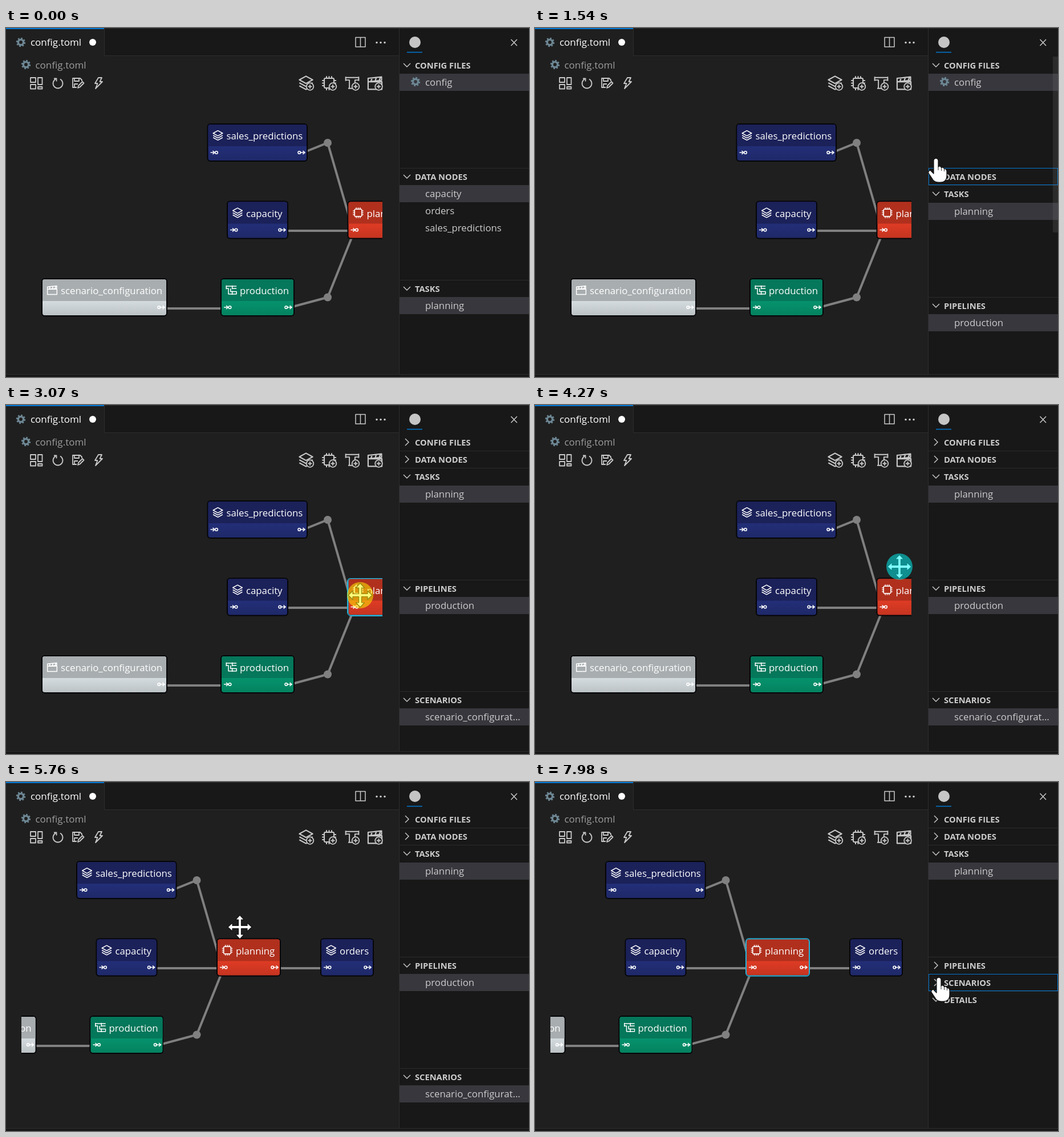
An HTML page for the animation above (8 s loop, 917 by 611 pixels).

```html
<!DOCTYPE html>
<html lang="en">
<head>
<meta charset="utf-8">
<title>Config editor</title>
<style>
html, body { margin: 0; width: 100%; height: 100%; overflow: hidden; background: #1f1f1f; }
body { position: relative; font: 16.8px "Open Sans", "Noto Sans", sans-serif; }
svg { display: block; overflow: visible; }
.layer { position: absolute; left: 0; top: 0; width: 917px; height: 611px; }
.icon, symbol { fill: none; stroke-linejoin: round; }
.icon { stroke: #c8c8c8; stroke-width: 1.8; }
.gear { fill: none; stroke: #6d8794; }

/* graph */
#graph { animation: pan 8s step-end infinite; }
.wire { fill: none; stroke: #808080; stroke-width: 4; }
.joint { fill: #808080; }
.node text { fill: #fff; }
.node .icon { stroke: #fff; }
.port { fill: none; stroke: #fff; stroke-width: 1.6; }
.port circle { fill: #fff; stroke: none; }
.ring { fill: none; stroke: #27b5dc; stroke-width: 2; animation: pick 8s step-end infinite; }

/* side bar */
#side { position: absolute; left: 690px; top: 50px; width: 227px; height: 555px; overflow: hidden; color: #ccc; }
.pane { height: 195.3px; overflow: hidden; white-space: nowrap; animation: var(--shut, none) 8s steps(2) infinite; }
.head { position: relative; box-sizing: border-box; height: 30.2px; padding-left: 27px;
  border-top: 1px solid #2b2b2b; font-size: 14.7px; font-weight: 700; line-height: 29px; }
.pane:first-child .head { border-color: transparent; }
.head::after { content: ""; position: absolute; inset: -1px 0 0; border: 1px solid #0078d4; opacity: 0;
  animation: var(--focus, none) 8s step-end infinite; }
.chev, .plus { position: absolute; fill: none; stroke: #ccc; stroke-width: 1.4; }
.chev { left: 6px; top: 7px; animation: var(--turn, none) 8s step-end infinite; }
.plus { right: 6px; top: 5px; opacity: 0; animation: var(--add, none) 8s step-end infinite; }
.row { position: relative; height: 30px; padding-left: 45px; line-height: 30px; }
.on { background: #37373d; }
.row svg { position: absolute; left: 28px; top: 14px; }
#bar { position: absolute; right: 0; top: 0; width: 9px; background: #79797933; opacity: 0;
  animation: grow 8s steps(2) infinite, show 8s step-end infinite; }

/* pointer */
#pointer { animation: travel 8s step-end infinite; }
#hand { animation: hand 8s step-end infinite; }
#move { animation: move 8s step-end infinite; }
#press { fill: none; animation: press 8s step-end infinite; }
.shape { fill: #fff; stroke: #111; stroke-width: 1.2; stroke-linejoin: round; }

@keyframes pan {
  0%, 53.375% { transform: translate(0, 0); animation-timing-function: steps(3); }
  57.25% { transform: translate(-103px, -23px); animation-timing-function: steps(4); }
  62%, 100% { transform: translate(-229.5px, -29px); }
}
@keyframes pick {
  0% { opacity: 0; } 37.125% { opacity: 1; } 44.625% { opacity: 0; } 73.5%, 100% { opacity: 1; }
}
@keyframes travel {
  0% { transform: translate(800px, 700px); }
  1.25% { transform: translate(790px, 600px); animation-timing-function: steps(8); }
  11.25% { transform: translate(719px, 264px); }
  12.5% { transform: translate(714px, 263px); }
  13.75%, 18% { transform: translate(711px, 262px); }
  19.25% { transform: translate(702px, 228px); animation-timing-function: steps(5); }
  25.5%, 28.75% { transform: translate(709px, 67px); animation-timing-function: steps(6); }
  35.875% { transform: translate(603px, 340px); }
  37.125% { transform: translate(612px, 335px); }
  38.375%, 44.625% { transform: translate(621px, 333px); animation-timing-function: steps(2); }
  47.125%, 53.375% { transform: translate(639px, 283px); animation-timing-function: steps(3); }
  57.25% { transform: translate(484.5px, 255px); animation-timing-function: steps(4); }
  62%, 72.25% { transform: translate(410px, 254px); animation-timing-function: steps(4); }
  77.25% { transform: translate(692px, 321px); animation-timing-function: steps(3); }
  81%, 87.25% { transform: translate(709px, 326px); animation-timing-function: steps(2); }
  89.75%, 100% { transform: translate(707px, 342px); }
}
@keyframes hand { 0% { opacity: 1; } 31.1% { opacity: 0; } 77.25%, 100% { opacity: 1; } }
@keyframes move { 0% { opacity: 0; } 31.1% { opacity: 1; } 77.25%, 100% { opacity: 0; } }
@keyframes press {
  0%, 16.75%, 28.125%, 44.625%, 72%, 87.25%, 97.25%, 100% { fill: #ff00; }
  15.5%, 26.875%, 37.125%, 81%, 91% { fill: #fff00088; }
  53.375% { fill: #00ffff80; }
}
@keyframes shut-data { 0%, 16.75% { height: 195.3px; } 19.25%, 100% { height: 30.2px; } }
@keyframes shut-config { 0%, 28.125% { height: 195.3px; } 30.625%, 100% { height: 30.2px; } }
@keyframes shut-pipes { 0%, 87.25% { height: 195.3px; } 89.75%, 100% { height: 30.2px; } }
@keyframes shut-scenes { 0%, 97.25% { height: 195.3px; } 99.75%, 100% { height: 30.2px; } }
@keyframes turn-data { 0% { transform: none; } 16.75%, 100% { transform: rotate(-90deg); } }
@keyframes turn-config { 0% { transform: none; } 28.125%, 100% { transform: rotate(-90deg); } }
@keyframes turn-pipes { 0% { transform: none; } 87.25%, 100% { transform: rotate(-90deg); } }
@keyframes turn-scenes { 0% { transform: none; } 97.25%, 100% { transform: rotate(-90deg); } }
@keyframes focus-data { 0%, 28.125%, 100% { opacity: 0; } 16.75% { opacity: 1; } }
@keyframes focus-config { 0%, 37.125%, 100% { opacity: 0; } 28.125% { opacity: 1; } }
@keyframes focus-pipes { 0%, 97.25%, 100% { opacity: 0; } 87.25% { opacity: 1; } }
@keyframes focus-scenes { 0% { opacity: 0; } 97.25%, 100% { opacity: 1; } }
@keyframes add-data { 0%, 16.75%, 100% { opacity: 0; } 10% { opacity: 1; } }
@keyframes add-pipes { 0%, 87.25%, 100% { opacity: 0; } 77.25% { opacity: 1; } }
@keyframes add-scenes { 0%, 97.25%, 100% { opacity: 0; } 89.75% { opacity: 1; } }
@keyframes grow {
  0%, 16.75% { height: 263px; } 19.25%, 28.125% { height: 308px; }
  30.625%, 87.25% { height: 367px; } 89.75%, 100% { height: 456px; }
}
@keyframes show {
  0%, 37.125%, 97.25%, 100% { opacity: 0; } 2.5%, 77.25% { opacity: 1; }
}
</style>
</head>
<body>
<svg class="layer" viewBox="0 0 917 611">
  <defs>
    <symbol id="layers" viewBox="0 0 24 24"><path d="M12 2 22 7.5 12 13 2 7.5zM2 12l10 5.5L22 12M2 16.5 12 22l10-5.5"/></symbol>
    <symbol id="chip" viewBox="0 0 24 24"><path d="M6 4.500h12q1.500 0 1.500 1.500v12q0 1.500-1.500 1.500H6q-1.500 0-1.500-1.500V6q0-1.500 1.500-1.500zM8 1v3.500M12 1v3.500M16 1v3.500M8 19.500V23M12 19.500V23M16 19.500V23M1 8h3.500M1 12h3.500M1 16h3.500M19.500 8H23M19.500 12H23M19.500 16H23"/></symbol>
    <symbol id="tee" viewBox="0 0 24 24"><path d="M1.500 2v7M22.500 2v7M1.500 3.500h21M1.500 7.500h6V21h9V7.500h6M5.500 21h13"/></symbol>
    <symbol id="pipe" viewBox="0 0 24 24"><path d="M1.500 2v8M1.500 3.500H14M1.500 8.500H6V20h8M10.500 8.500V15H14M14 2v8M14 3.500h9M14 8.500h9M14 13.500v8M14 15h9v5h-9"/></symbol>
    <symbol id="clap" viewBox="0 0 24 24"><path d="M2 10h20v11H2zM2 10V5l19.500-2v5L2 10M8 4.500 6 9.500M14 4l-2 5M20 3.300 18 8.400"/></symbol>
    <g id="gear"><circle r="4.600" stroke-width="3.400"/><circle r="6.800" stroke-width="2.800" stroke-dasharray="2.670"/></g>
    <g id="in"><path d="M0 0h8M4-3l3.500 3L4 3"/><circle cx="10.500" r="2.300"/></g>
    <g id="out"><circle cx="2.300" r="2.300"/><path d="M3 0h9M8.500-3 12 0 8.500 3"/></g>
    <g id="badge"><circle r="6.300" fill="#1f1f1f"/><path d="M-3.500 0h7M0-3.500v7"/></g>
    <linearGradient id="sheen" x2="0" y2="1"><stop offset=".55" stop-opacity="0"/><stop offset="1" stop-opacity=".13"/></linearGradient>
    <clipPath id="view"><path d="M27 115h633v490H27z"/></clipPath>
  </defs>

  <!-- window frame -->
  <path d="M172 0h745v48H172zM690 0h227v611H690zM0 607h917v4H0z" fill="#181818"/>
  <path d="M172 .5h745M172.500 0v48.500H689M689.500 0v606M0 606.500h917" fill="none" stroke="#2d2d2d"/>
  <path d="M0 1h172" stroke="#0078d4" stroke-width="2"/>
  <path d="M703 42.500h27" stroke="#0078d4" stroke-width="1.500"/>
  <use href="#gear" class="gear" x="26" y="25"/>
  <text x="43" y="31" font-size="17" fill="#fff">config.toml</text>
  <circle cx="152" cy="25" r="6" fill="#fff"/>
  <use href="#gear" class="gear" x="35" y="64"/>
  <text x="51.500" y="71" font-size="17" fill="#9d9d9d">config.toml</text>
  <circle cx="717" cy="25" r="10" fill="#c5c5c5"/>
  <path d="M613 16.500h17v16.500h-17zM621.500 16.500V33M885.500 20l10.500 11M896 20l-10.500 11" class="icon" style="stroke-width:1.500"/>
  <g fill="#ccc"><circle cx="650" cy="25.500" r="1.700"/><circle cx="657" cy="25.500" r="1.700"/><circle cx="664" cy="25.500" r="1.700"/></g>

  <!-- toolbar -->
  <g class="icon">
    <path d="M43 87h9v8h-9zM43 99h9v7.500h-9zM56 87h7.500v12H56zM56 103h7.500v3.500H56z"/>
    <path d="M87 89.500a8.500 8.500 0 1 0 8 0M84 88.500h4.500v5"/>
    <path d="M124 104h-7V88h13l3 3v2M120 88v5h8v-5M120 104v-6h6M126 105l1-4 7-7 2.500 2.500-7 7z"/>
    <path d="M162 87h6l-3.500 7h4.500l-12 12 3.500-9H156z"/>
    <use href="#layers" x="512" y="82" width="28" height="28"/><use href="#badge" x="533" y="102.500"/>
    <use href="#chip" x="553" y="83" width="27" height="27"/><use href="#badge" x="573" y="102.500"/>
    <use href="#tee" x="593" y="83" width="28" height="26"/><use href="#badge" x="613" y="102.500"/>
    <use href="#clap" x="632" y="82" width="30" height="29"/><use href="#badge" x="653.500" y="102.500"/>
  </g>

  <g clip-path="url(#view)">
    <g id="graph">
      <path class="wire" d="M524 217 564 201 609 356M480 355h130M268 491h120M495 490 564 471.500 611 355M700 355h90"/>
      <circle class="joint" cx="564" cy="201" r="7"/><circle class="joint" cx="564" cy="471.500" r="7"/>
      <g id="nodes"></g>
    </g>
  </g>
</svg>

<div id="side">
  <div class="pane" style="--shut:shut-config;--turn:turn-config;--focus:focus-config">
    <div class="head">CONFIG FILES</div>
    <div class="row on"><svg width="1" height="1" class="gear"><use href="#gear"/></svg>config</div>
  </div>
  <div class="pane" style="--shut:shut-data;--turn:turn-data;--focus:focus-data;--add:add-data">
    <div class="head">DATA NODES</div>
    <div class="row on">capacity</div>
    <div class="row">orders</div>
    <div class="row">sales_predictions</div>
  </div>
  <div class="pane">
    <div class="head">TASKS</div>
    <div class="row on">planning</div>
  </div>
  <div class="pane" style="--shut:shut-pipes;--turn:turn-pipes;--focus:focus-pipes;--add:add-pipes">
    <div class="head">PIPELINES</div>
    <div class="row on">production</div>
  </div>
  <div class="pane" style="--shut:shut-scenes;--turn:turn-scenes;--focus:focus-scenes;--add:add-scenes">
    <div class="head">SCENARIOS</div>
    <div class="row on">scenario_configurat...</div>
  </div>
  <div class="pane"><div class="head">DETAILS</div></div>
  <div id="bar"></div>
</div>

<svg class="layer" viewBox="0 0 917 611">
  <g id="pointer">
    <g id="hand">
      <path class="shape" d="M-3 4C-3-1 5-1 5 4V15C7 13 10 14 10.500 17 12 15 15 16 15.500 19 18 18 20 20 20 23V30C20 38 16 42 9 42H5C-1 42-4 39-6 35L-12 26C-13 22-9 20-7 23L-3 27z"/>
      <path d="M5 15v6M10.500 17v5M15.500 19v4" stroke="#333" fill="none"/>
    </g>
    <path id="move" class="shape" d="M0-21 7.500-13H2.500V-2.500H13V-7.500L21 0 13 7.500V2.500H2.500V13H7.500L0 21-7.500 13H-2.500V2.500H-13V7.500L-21 0-13-7.500V-2.500H-2.500V-13H-7.500z"/>
    <circle id="press" r="23"/>
  </g>
</svg>

<script>
const paint = {
  blue: ["#1b2159", "#232f79"],
  red: ["#b0301d", "#e23c25"],
  green: ["#05775a", "#05956e"],
  grey: ["#a8adaf", "#d8dfe2"]
};

function node(name, x, y, w, icon, tone, extra = "") {
  const [head, body] = paint[tone];
  const inner = `x="2" y="2" width="${w - 4}" height="63" rx="4"`;
  const input = icon === "clap" ? "" : `<use href="#in" class="port" x="6" y="51"/>`;
  return `<g class="node" transform="translate(${x} ${y})">
    <rect width="${w}" height="67" rx="6" fill="#050508"/>
    <rect ${inner} fill="${body}"/><rect ${inner} fill="url(#sheen)"/>
    <path d="M2 40V6q0-4 4-4H${w - 6}q4 0 4 4V40z" fill="${head}"/>
    <use href="#${icon}" class="icon" x="9" y="11" width="20" height="20"/>
    <text x="34" y="28">${name}</text>
    ${input}<use href="#out" class="port" x="${w - 17}" y="51"/>${extra}</g>`;
}

document.getElementById("nodes").innerHTML = [
  node("sales_predictions", 352.5, 167, 176.5, "layers", "blue"),
  node("capacity", 387, 302.5, 108, "layers", "blue"),
  node("planning", 598.5, 302.5, 113, "chip", "red",
    `<rect class="ring" x="1" y="1" width="111" height="65" rx="5"/>`),
  node("orders", 780.5, 302.5, 94, "layers", "blue"),
  node("scenario_configuration", 62, 438, 221, "clap", "grey"),
  node("production", 376, 438, 130, "pipe", "green")
].join("");

for (const head of document.querySelectorAll(".head")) {
  head.insertAdjacentHTML("beforeend",
    `<svg class="chev" width="14" height="14"><path d="M1 4l6 6 6-6"/></svg>
     <svg class="plus" width="18" height="18"><path d="M0 9h18M9 0v18"/></svg>`);
}
</script>
</body>
</html>
```
